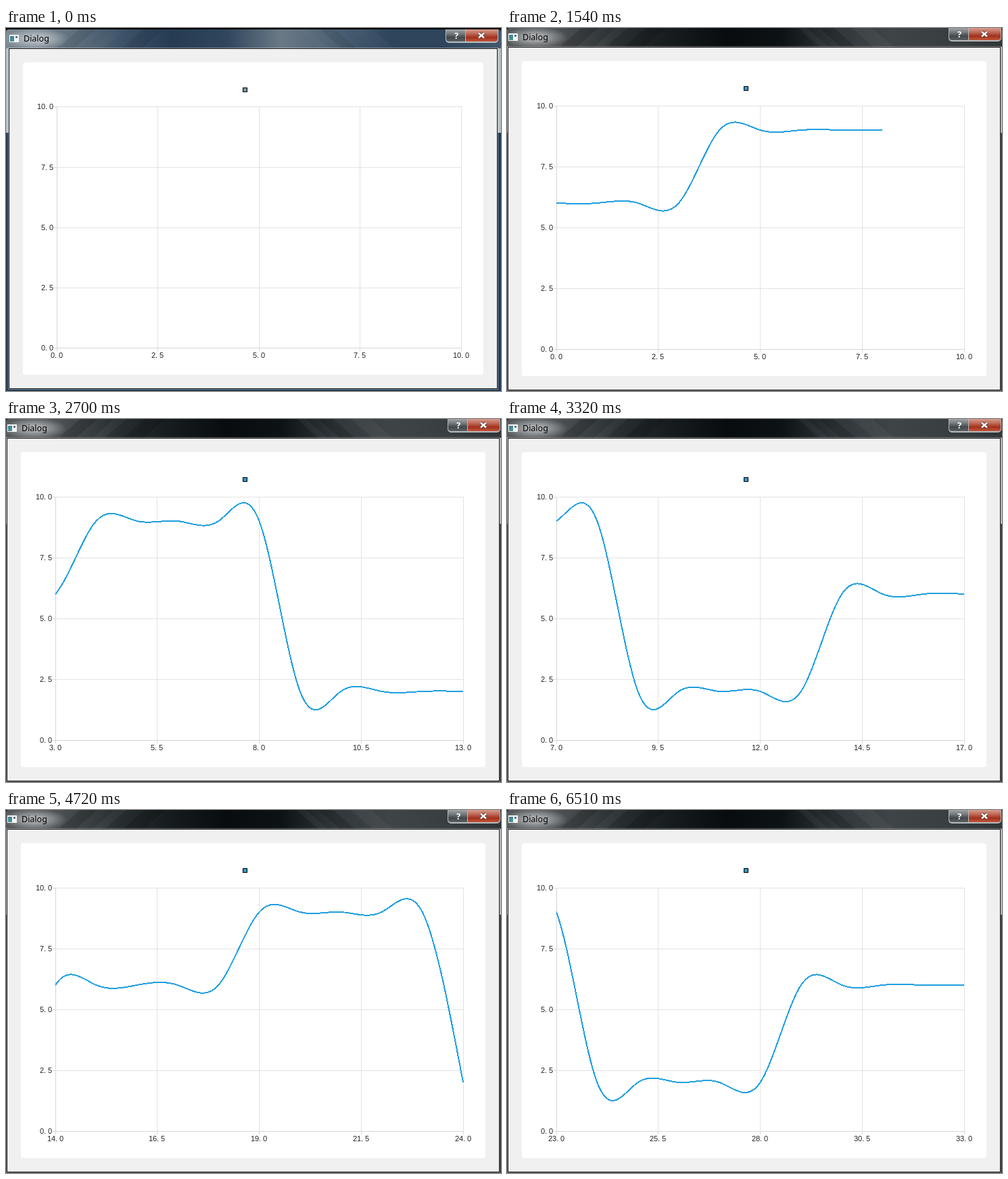
Recreate the animation shown at these times as an HTML page with a canvas. Size 732 by 537 pixels, loop 6.66 s.

```html
<!DOCTYPE html>
<html lang="en">
<head>
<meta charset="utf-8">
<title>Dialog</title>
<style>
html, body { margin: 0; width: 100%; height: 100%; overflow: hidden; background: #000; }
canvas { display: block; }
svg { position: absolute; left: 73px; top: 115px; overflow: hidden; }
path { fill: none; stroke: #209fdf; stroke-width: 2; shape-rendering: crispEdges; }
</style>
</head>
<body>
<canvas id="stage" width="732" height="537"></canvas>
<svg width="604" height="361"><path id="curve"/></svg>
<script>
const ctx = document.getElementById('stage').getContext('2d');
const curvePath = document.getElementById('curve');
const LOOP = 6660;
// Moments at which the next sample is appended.
const TICKS = [70, 300, 530, 680, 930, 1080, 1310, 1540, 1700, 1930, 2090, 2320, 2550,
  2710, 2940, 3100, 3320, 3560, 3710, 3950, 4100, 4330, 4570, 4720, 4950, 5110, 5340,
  5500, 5730, 5960, 6110, 6350, 6510];
const PLOT = { left: 73, right: 676, top: 115, bottom: 475 };
const OPEN = {
  scale: 1, dx: 0, dy: 0, marker: '#3795c8', stripes: 0.8,
  bar: ['#55595b', '#4b4f51', '#292f31', '#161b1d', '#080c0e', '#0d1214', '#31373a', '#3f4447', '#393e41', '#303538'],
  side: ['#a9adaf', '#17191a']
};
const OPENING = {
  scale: 0.9917, dx: 2.85, dy: 2.25, marker: '#7b95a5', stripes: 0.4,
  bar: ['#7d8992', '#687784', '#3f556a', '#263c53', '#2f465c', '#6a7986', '#4c6174', '#2e455c', '#2e455b', '#43586c'],
  side: ['#b4bec5', '#243c55']
};
let view = OPEN;

const X = x => Math.round(x * view.scale + view.dx);
const Y = y => Math.round(y * view.scale + view.dy);

function box(x, y, w, h, fill, radius = 0) {
  const left = X(x), top = Y(y);
  ctx.fillStyle = fill;
  ctx.beginPath();
  ctx.roundRect(left, top, X(x + w) - left, Y(y + h) - top, radius);
  ctx.fill();
}

function gradient(x0, y0, x1, y1, colors) {
  const g = ctx.createLinearGradient(X(x0), Y(y0), X(x1), Y(y1));
  colors.forEach((c, i) => g.addColorStop(i / (colors.length - 1), c));
  return g;
}

function text(str, x, y, font, color, align = 'left') {
  ctx.font = font;
  ctx.fillStyle = color;
  ctx.textAlign = align;
  ctx.fillText(str, x, y);
}

// Axis labels sit on a fixed grid of 6 px cells.
function label(value, x, y, anchor) {
  const str = value.toFixed(1);
  const start = X(x) - str.length * 6 * anchor;
  [...str].forEach((ch, i) =>
    text(ch, start + i * 6, Y(y), '11px "Liberation Sans", sans-serif', '#222'));
}

function titleBar() {
  const top = Y(0), height = Y(28) - top;
  ctx.save();
  ctx.beginPath();
  ctx.roundRect(0, top, 732, height, [4, 4, 0, 0]);
  ctx.clip();
  ctx.fillStyle = gradient(0, 0, 732, 0, view.bar);
  ctx.fillRect(0, top, 732, height);
  ctx.globalAlpha = view.stripes;
  [[110, 25], [160, 18], [205, 30], [430, 14], [462, 22], [510, 30]].forEach(([x, w], i) => {
    const lean = i < 3 ? -34 : 34;
    ctx.fillStyle = i % 2 ? 'rgba(255,255,255,.05)' : 'rgba(0,0,0,.2)';
    ctx.beginPath();
    ctx.moveTo(x, 0);
    ctx.lineTo(x + w, 0);
    ctx.lineTo(x + w + lean, 30);
    ctx.lineTo(x + lean, 30);
    ctx.fill();
  });
  ctx.globalAlpha = 1;
  ctx.translate(X(42), Y(14));
  ctx.scale(1, 0.34);
  const glow = ctx.createRadialGradient(0, 0, 10, 0, 0, 48);
  glow.addColorStop(0, 'rgba(235,238,240,.6)');
  glow.addColorStop(1, 'rgba(235,238,240,0)');
  ctx.fillStyle = glow;
  ctx.fillRect(-50, -50, 100, 100);
  ctx.restore();

  box(2, 8, 14, 11, '#f4f6f7');
  box(3, 10, 6, 8, gradient(3, 10, 9, 18, ['#3d7f9c', '#4b9a86']));
  box(11, 10, 3, 3, '#66757e');
  text('Dialog', X(23), Y(18), '12.5px "Noto Sans", "Open Sans", sans-serif', '#000');
}

function buttons() {
  box(653, 0, 78, 20, 'rgba(225,228,230,.75)', [0, 0, 5, 5]);
  box(654, 0, 28, 18, gradient(0, 0, 0, 18, ['#a0a4a6', '#777c7f', '#42484b', '#5c6265']), [0, 0, 0, 4]);
  box(683, 0, 47, 18, gradient(0, 0, 0, 18, ['#d79b8d', '#c06c5b', '#a2301d', '#c2573b']), [0, 0, 4, 0]);
  text('?', X(669), Y(14), 'bold 13px "Open Sans", sans-serif', '#fff', 'center');
  const cx = X(706), cy = Y(9);
  for (const [color, width] of [['#5d3b36', 4.5], ['#fff', 2.4]]) {
    ctx.strokeStyle = color;
    ctx.lineWidth = width;
    ctx.beginPath();
    ctx.moveTo(cx - 4, cy - 3.5);
    ctx.lineTo(cx + 4, cy + 3.5);
    ctx.moveTo(cx + 4, cy - 3.5);
    ctx.lineTo(cx - 4, cy + 3.5);
    ctx.stroke();
  }
}

function windowFrame() {
  ctx.fillStyle = '#000';
  ctx.fillRect(0, 0, 732, 537);
  ctx.fillStyle = view.side[0];
  ctx.fillRect(0, Y(14), 732, 155 - Y(14));
  ctx.fillStyle = view.side[1];
  ctx.fillRect(0, 155, 732, 382);
  titleBar();
  buttons();
  box(0, 27, 731, 510, 'rgba(255,255,255,.4)');
  box(1, 28, 729, 508, '#111');
  box(2, 29, 727, 506, '#f0f0f0');
  box(22, 49, 687, 466, '#fff', 4);
}

function axes(first) {
  const { left, right, top, bottom } = PLOT;
  for (let i = 0; i <= 4; i++) {
    const x = Math.round(left + (right - left) * i / 4 - 0.3);
    const y = bottom - (bottom - top) * i / 4;
    ctx.fillStyle = i ? '#e2e2e2' : '#d6d6d6';
    ctx.fillRect(X(x), Y(top), 1, Y(bottom) - Y(top));
    ctx.fillRect(X(left), Y(y), X(right) - X(left) + 1, 1);
    ctx.fillStyle = '#d6d6d6';
    ctx.fillRect(X(x), Y(bottom), 1, 5);
    ctx.fillRect(X(left) - 4, Y(y), 4, 1);
    label(i * 2.5, 68, y + 4, 1);
    label(first + i * 2.5, x, 490, 0.5);
  }
  ctx.fillStyle = '#000';
  ctx.fillRect(X(350), Y(86), 7, 7);
  ctx.fillStyle = view.marker;
  ctx.fillRect(X(350) + 1, Y(86) + 1, 5, 5);
}

// The signal repeats every 15 samples.
function sample(n) {
  const k = n % 15;
  return k < 4 || k === 14 ? 6 : k < 9 ? 9 : 2;
}

// Second derivatives of the natural cubic spline with unit spacing.
function curvature(v) {
  const n = v.length, m = Array(n).fill(0), c = Array(n).fill(0);
  for (let i = 1; i < n - 1; i++) {
    c[i] = 1 / (4 - c[i - 1]);
    m[i] = (6 * (v[i + 1] - 2 * v[i] + v[i - 1]) - m[i - 1]) * c[i];
  }
  for (let i = n - 2; i > 0; i--) m[i] -= c[i] * m[i + 1];
  return m;
}

function curve(last, first) {
  const width = PLOT.right - PLOT.left, height = PLOT.bottom - PLOT.top;
  const point = (x, v) =>
    `${((x - first) * width / 10).toFixed(2)},${(height - v * height / 10).toFixed(2)} `;
  const v = Array.from({ length: last + 1 }, (_, i) => sample(i));
  const m = curvature(v);
  let d = 'M' + point(0, v[0]);
  for (let i = 0; i < last; i++) {
    const rise = v[i + 1] - v[i];
    const slopeIn = rise - (2 * m[i] + m[i + 1]) / 6;
    const slopeOut = rise + (m[i] + 2 * m[i + 1]) / 6;
    d += 'C' + point(i + 1 / 3, v[i] + slopeIn / 3)
      + point(i + 2 / 3, v[i + 1] - slopeOut / 3) + point(i + 1, v[i + 1]);
  }
  return d;
}

const start = performance.now();
function draw() {
  const t = (performance.now() - start) % LOOP;
  const last = TICKS.filter(tick => tick <= t).length;
  const first = Math.max(0, last - 10);
  view = last ? OPEN : OPENING;
  windowFrame();
  axes(first);
  curvePath.setAttribute('d', last ? curve(last, first) : '');
  requestAnimationFrame(draw);
}
draw();
</script>
</body>
</html>
```
